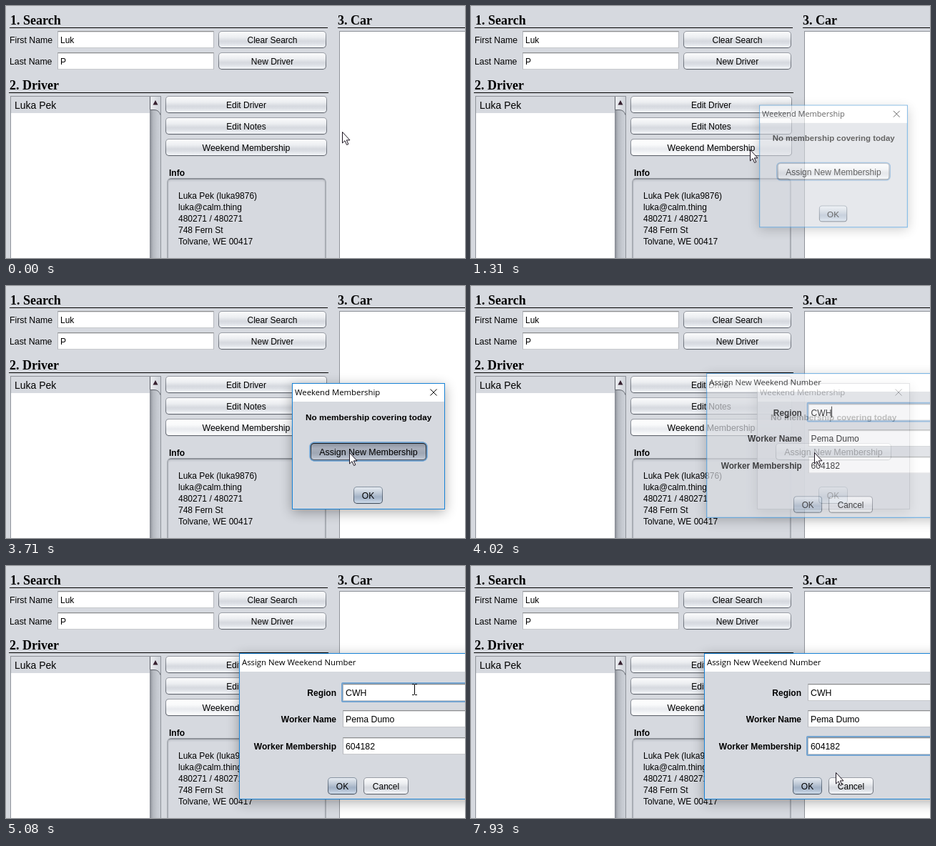
Recreate the animation shown at these times as an HTML page. Size 642 by 353 pixels, loop 8000 ms.

```html
<!DOCTYPE html>
<html lang="en">
<head>
<meta charset="utf-8">
<title>Weekend membership</title>
<style>
html, body { margin: 0; width: 100%; height: 100%; overflow: hidden; background: #d6d9df; }
body { position: relative; font: 12px/16px "Liberation Sans", Arial, sans-serif; color: #000; }
body *, .field::after { position: absolute; box-sizing: border-box; white-space: pre; }
h2 { margin: 0; font: bold 18px/20px "Liberation Serif", "Times New Roman", serif; }
.rule { height: 1px; background: #000; }
.label { left: 5px; font-size: 12.3px; }

.btn {
  --edge: linear-gradient(#9b9fa7, #5f646d);
  --fill: linear-gradient(#fbfbfc, #eceef1 35%, #d6d9df 60%, #dcdfe5 75%, #f5f7fa);
  height: 24px; padding-top: 1px; border: 1px solid transparent; border-radius: 5px;
  background: var(--fill) padding-box, var(--edge) border-box;
  box-shadow: 0 1px 0 #c9ccd2; line-height: 22px; text-align: center;
}
.wide { left: 223px; width: 226px; }
.side { left: 297px; width: 151px; }
.week { top: 186px; font-size: 12.3px; }
.new { left: 426px; top: 220px; width: 162px; font-size: 12.45px; }
.default {
  --edge: linear-gradient(#8b97a5, #3f4b5b);
  --fill: linear-gradient(#e6ebf1, #bcc7d5 40%, #a3b2c6 60%, #aebdd0 75%, #cfdceb);
}
.hover { --fill: linear-gradient(#fff, #f8f9fa 35%, #e8eaee 60%, #eef0f3 75%, #fff); }
.down {
  --edge: linear-gradient(#14171c, #4c5460);
  --fill: linear-gradient(#8f96a3, #a9afbb 30%, #9fa7b4 60%, #a9b1be 75%, #c3cad5);
}
.ring { box-shadow: 0 0 0 1.5px #73a4d1; }

.field {
  height: 24px; padding: 1px 0 0 3px; line-height: 22px; background: #fff;
  border: 1px solid #b5b8bd; border-top-color: #8d8e8f; border-bottom-color: #c8cacd;
  box-shadow: inset 0 1px 0 #dcdddf;
}
.search { left: 72px; width: 219px; }
.form { left: 471px; width: 206px; font-size: 12.3px; }
.form::after { content: ""; inset: -3px; border: 2px solid #73a4d1; border-radius: 2px; visibility: hidden; }
.caret { width: 1px; height: 16px; background: #000; visibility: hidden; }

.dialog { inset: 0; transform-origin: 507px 224.5px; opacity: 0; }
.frame { background: #d6d9df; border: 1px solid #1883d7; box-shadow: 0 4px 16px rgba(0, 0, 0, .32); }
.bar { left: 0; top: 0; width: 100%; height: 25px; background: #fff; }
.title { font: 11.35px/16px "Open Sans", "Noto Sans", sans-serif; }
.form-label { right: calc(100% - 462px); }
svg { overflow: visible; }

/* One clock for everything: 8 s, hard steps. */
.dialog, .cursor, .arrow, .beam, .state, .caret, .form::after, #status .frame { animation: 8s step-end infinite; }
.state { visibility: hidden; }
.cursor { left: 0; top: 0; animation-name: travel; }
.arrow { left: 0; top: 0; animation-name: arrow; }
.beam { left: -3px; top: -8px; animation-name: beam; }
.notes-hover { animation-name: notes-hover; }
.week-hover { animation-name: week-hover; }
.week-down { animation-name: week-down; }
.week-ring { animation-name: week-ring; }
.new-ring { animation-name: new-ring; }
.new-hover { animation-name: new-hover; }
.new-down { animation-name: new-down; }
#status { animation-name: status; }
#status .frame { animation-name: blur; }
#assign { animation-name: assign; }
#region::after { animation-name: region-focus; }
#worker::after { animation-name: worker-focus; }
#member::after { animation-name: member-focus; }
#caret1 { animation-name: caret1; }
#caret2 { animation-name: caret2; }
#caret3 { animation-name: caret3; }

@keyframes travel {
  0% { transform: translate(470px, 176px); }
  .85% { transform: translate(464px, 176px); }
  1.85% { transform: translate(444px, 178px); }
  2.85% { transform: translate(417px, 188px); }
  3.72% { transform: translate(398px, 197px); }
  4.72% { transform: translate(390px, 201px); }
  29.1% { transform: translate(396px, 203px); }
  30.1% { transform: translate(410px, 208px); }
  30.97% { transform: translate(428px, 215px); }
  31.97% { transform: translate(446px, 222px); }
  32.97% { transform: translate(462px, 228px); }
  33.85% { transform: translate(474px, 231px); }
  34.85% { transform: translate(480px, 233px); }
  60.85% { transform: translate(500px, 218px); }
  62.1% { transform: translate(550px, 184px); }
  63.47% { transform: translate(571px, 173px); }
  68.97% { transform: translate(572px, 180px); }
  69.97% { transform: translate(572px, 192px); }
  71.1% { transform: translate(573px, 205px); }
  72.1% { transform: translate(574px, 213px); }
  73.1% { transform: translate(574px, 217px); }
  74.97% { transform: translate(574px, 220px); }
  83.72% { transform: translate(570px, 225px); }
  84.72% { transform: translate(565px, 233px); }
  85.6% { transform: translate(559px, 247px); }
  86.47% { transform: translate(554px, 254px); }
  88.35% { transform: translate(551px, 256px); }
  90.35% { transform: translate(549px, 256px); }
  98.1% { transform: translate(530px, 272px); }
  99.1%, 100% { transform: translate(510px, 289px); }
}
@keyframes arrow {
  0%, 69.97%, 84.72%, 98.1%, 100% { visibility: visible; }
  60.85%, 71.1%, 85.6% { visibility: hidden; }
}
@keyframes beam {
  0%, 69.97%, 84.72%, 98.1%, 100% { visibility: hidden; }
  60.85%, 71.1%, 85.6% { visibility: visible; }
}
@keyframes notes-hover { 1.85% { visibility: visible; } 2.85% { visibility: hidden; } }
@keyframes week-hover { 2.85%, 100% { visibility: visible; } }
@keyframes week-down { 13.45% { visibility: visible; } 15.32% { visibility: hidden; } }
@keyframes week-ring { 13.45% { visibility: visible; } 16.32% { visibility: hidden; } }
@keyframes new-ring { 0% { visibility: visible; } 49.2% { visibility: hidden; } }
@keyframes new-hover { 31.97% { visibility: visible; } 49.2% { visibility: hidden; } }
@keyframes new-down { 46.32% { visibility: visible; } 49.2% { visibility: hidden; } }
@keyframes blur { 49.2%, 100% { border-color: #8f9399; } }
@keyframes status {
  0% { opacity: 0; }
  15.32% { opacity: .15; transform: scale(.92); }
  16.32% { opacity: .6; transform: scale(.97); }
  17.2% { opacity: .9; transform: scale(.99); }
  18.2% { opacity: 1; transform: none; }
  49.2% { opacity: .95; transform: none; }
  50.2% { opacity: .85; transform: none; }
  51.32% { opacity: .3; transform: none; }
  52.1%, 100% { opacity: 0; transform: none; }
}
@keyframes assign {
  0% { opacity: 0; }
  49.2% { opacity: .25; transform: scale(.94); }
  50.2% { opacity: .7; transform: translateY(-1px) scale(.982, .988); }
  51.32% { opacity: .93; transform: scale(.995); }
  52.1%, 100% { opacity: 1; transform: none; }
}
@keyframes region-focus { 0% { visibility: visible; } 77.85%, 100% { visibility: hidden; } }
@keyframes worker-focus { 77.85% { visibility: visible; } 88.35% { visibility: hidden; } }
@keyframes member-focus { 88.35%, 100% { visibility: visible; } }
@keyframes caret1 {
  0%, 58.97%, 66.97% { visibility: visible; }
  55.22%, 62.1%, 73.1%, 100% { visibility: hidden; }
}
@keyframes caret2 { 77.85% { visibility: visible; } 83.72% { visibility: hidden; } }
@keyframes caret3 { 88.35% { visibility: visible; } 96.22% { visibility: hidden; } }
</style>
</head>
<body>
<h2 style="left:6px;top:10px">1. Search</h2>
<i class="rule" style="left:5px;top:30px;width:445px"></i>
<span class="label" style="top:40px">First Name</span>
<span class="label" style="top:70px">Last Name</span>
<div class="field search" style="top:35px">Luk</div>
<div class="field search" style="top:65px">P</div>
<div class="btn side" style="top:35px">Clear Search</div>
<div class="btn side" style="top:65px">New Driver</div>

<h2 style="left:5px;top:101px">2. Driver</h2>
<i class="rule" style="left:4px;top:121px;width:447px"></i>
<div style="left:6px;top:126px;width:211px;height:240px;background:#fff;border:1px solid #8f939a">
  <div style="left:0;top:0;width:195px;height:23px;background:#d6d9df"></div>
  <span style="left:5px;top:4px;font-size:14px">Luka Pek</span>
  <svg style="left:194px;top:0" width="15" height="240">
    <defs>
      <linearGradient id="track"><stop stop-color="#858991"/><stop offset=".3" stop-color="#b3b7be"/><stop offset=".7" stop-color="#c6cad1"/><stop offset="1" stop-color="#cdd1d8"/></linearGradient>
      <linearGradient id="cap"><stop stop-color="#eef0f3"/><stop offset="1" stop-color="#cfd3da"/></linearGradient>
    </defs>
    <path d="M0 0h15v240H0z" fill="url(#track)"/>
    <path d="M0 0h15v25q-2-6-8-6.500H0z" fill="url(#cap)"/>
    <path d="M.5 0v18.500H6q7 0 9 7" fill="none" stroke="#60646c"/>
    <path d="M8 5l3.500 6.500h-7z" fill="#35202f"/>
  </svg>
</div>

<div class="btn wide" style="top:126px">Edit Driver</div>
<div class="btn wide" style="top:156px">Edit Notes</div>
<div class="btn wide hover state notes-hover" style="top:156px">Edit Notes</div>
<div class="btn wide week">Weekend Membership</div>
<div class="btn wide week hover state week-hover">Weekend Membership</div>
<div class="btn wide week hover ring state week-ring">Weekend Membership</div>
<div class="btn wide week down ring state week-down">Weekend Membership</div>

<b style="left:228px;top:226px">Info</b>
<div style="left:225px;top:241px;width:223px;height:130px;border:2px solid #a9adb4;border-top-color:#8e9299;border-radius:6px;box-shadow:inset 0 2px 2px #c3c6cc"></div>
<span style="left:241px;top:258px">Luka Pek (luka9876)
luka@calm.thing
480271 / 480271
748 Fern St
Tolvane, WE 00417</span>

<h2 style="left:464px;top:10px">3. Car</h2>
<i class="rule" style="left:464px;top:30px;width:178px"></i>
<div style="left:466px;top:35px;width:190px;height:330px;background:#fff;border:1px solid #8f939a"></div>

<div class="dialog" id="status">
  <div class="frame" style="left:400px;top:136px;width:214px;height:177px"><i class="bar"></i></div>
  <span class="title" style="left:404px;top:141px">Weekend Membership</span>
  <svg style="left:593px;top:144px" width="10" height="10"><path d="M.5.5l9 9m0-9l-9 9" stroke="#000" fill="none"/></svg>
  <b style="left:419px;top:176px;font-size:11.8px">No membership covering today</b>
  <div class="btn new">Assign New Membership</div>
  <div class="btn new ring state new-ring">Assign New Membership</div>
  <div class="btn new ring hover state new-hover">Assign New Membership</div>
  <div class="btn new ring down state new-down">Assign New Membership</div>
  <div class="btn default" style="left:486px;top:281px;width:41px">OK</div>
</div>

<div class="dialog" id="assign">
  <div class="frame" style="left:326px;top:122px;width:362px;height:205px"><i class="bar"></i></div>
  <span class="title" style="left:330px;top:127px">Assign New Weekend Number</span>
  <b class="form-label" style="top:170px">Region</b>
  <b class="form-label" style="top:207px">Worker Name</b>
  <b class="form-label" style="top:245px">Worker Membership</b>
  <div class="field form" id="region" style="top:165px">CWH</div>
  <div class="field form" id="worker" style="top:202px">Pema Dumo</div>
  <div class="field form" id="member" style="top:240px">604182</div>
  <i class="caret" id="caret1" style="left:504px;top:169px"></i>
  <i class="caret" id="caret2" style="left:545px;top:206px"></i>
  <i class="caret" id="caret3" style="left:517px;top:244px"></i>
  <div class="btn default" style="left:450px;top:296px;width:41px">OK</div>
  <div class="btn" style="left:500px;top:296px;width:63px">Cancel</div>
</div>

<div class="cursor">
  <svg class="arrow" width="12" height="19"><path d="M.5.5v15.500l3.500-3.300 2.600 5.800 2.300-1-2.600-5.600h4.700z" fill="#fff" stroke="#1c1420"/></svg>
  <svg class="beam" width="7" height="16"><path d="M0 .5h3m1 0h3M3.500 1v14M0 15.500h3m1 0h3" stroke="#000" fill="none"/></svg>
</div>
</body>
</html>
```
